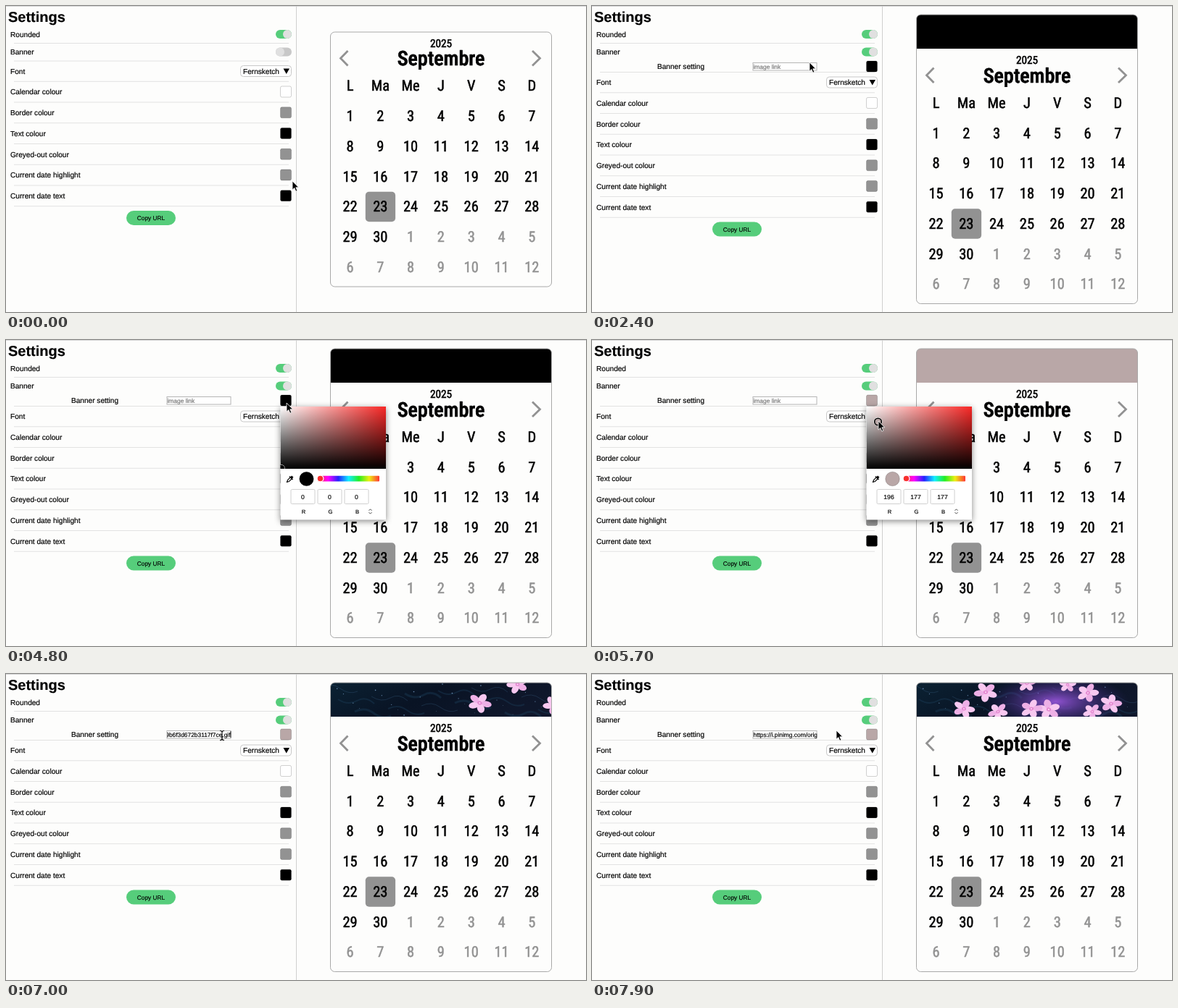
An HTML page that plays this animation: 800 px wide and 423 px high, repeating every 8000 ms.

```html
<!DOCTYPE html>
<html lang="en">
<head>
<meta charset="utf-8">
<title>Calendar settings</title>
<style>
  html, body { margin: 0; width: 100%; height: 100%; overflow: hidden; background: #fdfdfc; }
  svg {
    display: block; width: 800px; height: 423px;
    font: 10.1px 'Liberation Sans', Arial, sans-serif; text-rendering: geometricPrecision;
  }
  text { stroke: #000; stroke-width: .18; }
  .mid { text-anchor: middle; }
  .hint { fill: #757575; stroke: #757575; }
  .hand {
    font-family: 'Roboto Condensed', 'Open Sans Condensed', Roboto, sans-serif;
    font-stretch: condensed; font-weight: 400; font-size: 20.5px;
    text-anchor: middle; stroke-width: .5; stroke-linejoin: round;
  }
  .grey { fill: #929292; stroke: #929292; }
  .year { font-size: 15.3px; }
  .month { font-size: 28px; font-weight: 500; stroke-width: .7; }
  .panel { filter: drop-shadow(0 2px 4px #0007); }
</style>
</head>
<body>
<svg viewBox="0 0 800 423">
  <defs>
    <linearGradient id="sat"><stop stop-color="#fff"/><stop offset="1" stop-color="#f82826"/></linearGradient>
    <linearGradient id="val" x2="0" y2="1"><stop stop-opacity="0"/><stop offset="1"/></linearGradient>
    <linearGradient id="hue"></linearGradient>
    <linearGradient id="sky" x2="1" y2=".3">
      <stop stop-color="#0b2233"/><stop offset=".5" stop-color="#091324"/><stop offset="1" stop-color="#0f172b"/>
    </linearGradient>
    <radialGradient id="glow"><stop stop-color="#8f52d0"/><stop offset="1" stop-color="#3a2a80" stop-opacity="0"/></radialGradient>
    <clipPath id="field"><rect x="222" y="78" width="88.5" height="11"/></clipPath>
    <clipPath id="banner"><path d="M447.5 59V18a6 6 0 0 1 6-6h293a6 6 0 0 1 6 6V59z"/></clipPath>
    <clipPath id="shade"><rect x="378.5" y="92" width="145.5" height="86"/></clipPath>
  </defs>
  <g id="stage"></g>
</svg>
<script>
const LOOP = 8000;
const OFF = 650, ON = 1050, BANNER = 1900, OPEN = 4450, PRESS = 5050, CLOSE = 5900, PASTE = 6550, BLUR = 7600;
const GREY = '#929292', GREEN = [86, 205, 123], TRACK = [200, 200, 200];
const stage = document.getElementById('stage');

document.getElementById('hue').innerHTML =
  ['#f33', '#f0f', '#22f', '#1ef', '#2e2', '#ee1', '#f33']
    .map((c, i) => `<stop offset="${i / 6}" stop-color="${c}"/>`).join('');

// Pointer path: time, x, y of the tip
const path = [
  [100, 395, 242], [500, 380, 45], [1600, 380, 45], [1800, 380, 67], [2050, 380, 67],
  [2400, 300, 78], [2900, 268, 82], [3300, 375, 54], [3550, 375, 54], [3900, 403, 82],
  [4400, 387, 87], [4900, 387, 87], [5050, 406, 128], [5300, 395, 112], [5800, 395, 112],
  [6200, 298, 85], [7500, 298, 85], [7900, 337, 78]
];

// Blossoms: x, y at 7900 ms, size, speed x and y in px/s
const blossoms = [
  [630, 49, 15, -26, 10], [684, 26, 14, -24, 13], [543, 25, 15, -20, 62], [513, 48, 14, -12, 85],
  [560, 52, 13, 8, 88], [600, 13, 12, -18, 55], [606, 48, 14, 14, 84], [656, 15, 11, 10, 60],
  [716, 41, 14, -44, -3], [690, 52, 12, 6, 90]
];

const clamp = (v, a = 0, b = 1) => Math.min(b, Math.max(a, v));
const mix = (a, b, k) => a + (b - a) * k;
const smooth = k => k * k * (3 - 2 * k);
const ease = (t, start, length = 400) => 1 - (1 - clamp((t - start) / length)) ** 2;
const rgb = c => `rgb(${c.map(Math.round)})`;

const text = (x, y, s, attrs = '') => `<text x="${x}" y="${y}" ${attrs}>${s}</text>`;
const rect = (x, y, w, h, fill, attrs = '') =>
  `<rect x="${x}" y="${y}" width="${w}" height="${h}" fill="${fill}" ${attrs}/>`;
const circle = (x, y, r, fill, attrs = '') => `<circle cx="${x}" cy="${y}" r="${r}" fill="${fill}" ${attrs}/>`;
const line = (d, color, width = 1) => `<path d="${d}" fill="none" stroke="${color}" stroke-width="${width}"/>`;
const hand = (x, y, s, kind = '') => text(x, y, s, `class="hand ${kind}"`);
const divider = y => line(`M11 ${y}H390`, '#e2e2e2');
const swatch = (y, color) =>
  rect(378.5, y - 7.5, 15, 15, color, 'rx="2" stroke="#000" stroke-opacity=".18"');

function pointer(t) {
  const i = path.findIndex(p => p[0] > t);
  if (i < 0) return path.at(-1).slice(1);
  if (!i) return path[0].slice(1);
  const [a, b] = [path[i - 1], path[i]];
  const k = smooth((t - a[0]) / (b[0] - a[0]));
  return [mix(a[1], b[1], k), mix(a[2], b[2], k)];
}

// Colour chosen in the picker: what the fields say and what is painted
function choose(t) {
  if (t < PRESS) return { x: 379, y: 178, value: [0, 0, 0], paint: '#000' };
  const [x, y] = pointer(Math.min(t, 5300));
  const s = clamp((x - 381) / 144.5), v = 255 * (1 - clamp((y - 92) / 86.4));
  const value = [v, v * (1 - s), v * (1 - s)].map(Math.round);
  return { x: x - .5, y: y + 1, value, paint: rgb(value.map(c => c * .945)) };
}

const toggle = (y, k) =>
  rect(372, y - 6, 22, 12, rgb(TRACK.map((c, i) => mix(c, GREEN[i], k))), 'rx="6"') +
  circle(378 + 10 * k, y, 6, '#e0e0e0');

function settings(t, color) {
  const open = t >= BANNER, dy = open ? 15.5 : 0;
  let s = text(3, 22, 'Settings', 'font-size="20" font-weight="700"') +
    text(6, 42.5, 'Rounded') + toggle(39, 1 - ease(t, OFF) + ease(t, ON)) + divider(51.5) +
    text(6, 67, 'Banner') + toggle(63.5, ease(t, BANNER)) + divider(76 + dy);
  if (open) s += bannerRow(t, color);

  s += `<g transform="translate(0 ${dy})">` + text(6, 93.5, 'Font') +
    rect(323.5, 82.5, 70, 15, '#fff', 'rx="4" stroke="#c8c8c8"') + text(327, 93.5, 'Fernsketch') +
    '<path d="M382.5 86.5h8.5l-4.25 7.5z"/>' + divider(104.3);
  [['Calendar colour', '#fff'], ['Border colour', GREY], ['Text colour', '#000'],
    ['Greyed-out colour', GREY], ['Current date highlight', GREY], ['Current date text', '#000']
  ].forEach(([label, fill], i) => {
    const y = 118.5 + 28.75 * i;
    s += text(6, y + 3.8, label) + swatch(y, fill) + divider(y + 14.5);
  });
  return s + rect(166, 283, 68, 20, rgb(GREEN), 'rx="10"') +
    text(200, 296, 'Copy URL', 'class="mid" font-size="8.3"') + '</g>';
}

function bannerRow(t, color) {
  const pasted = t >= PASTE, blurred = t >= BLUR;
  const [x, content, attrs] = !pasted ? [222.5, 'image link', 'class="hint"']
    : blurred ? [222.5, 'https://i.pinimg.com/originals', '']
    : [309.5, '9b6f3d672b3117f7ce.gif', 'text-anchor="end"'];
  const caret = t > 6300 && !blurred && (t - PASTE + LOOP) % 1000 < 500;
  return text(90, 87, 'Banner setting') + rect(222, 78.5, 88, 10.5, '#fff', 'stroke="#b4b4b4"') +
    `<g clip-path="url(#field)">${text(x, 86.5, content, `font-size="8.4" ${attrs}`)}</g>` +
    (caret ? line(`M${pasted ? 310 : 223} 79v9`, '#000', .8) : '') + swatch(83.5, color);
}

function blossom([x, y, r, vx, vy], t) {
  const age = (t - 7900) / 1000, tilt = x % 40 - 20;
  let s = `<g transform="translate(${x + vx * age} ${y + vy * age}) rotate(${tilt}) ` +
    `scale(${r / 14} ${r / 17}) rotate(${x + age * 40})">`;
  for (let i = 0; i < 5; i++)
    s += `<ellipse cy="-8.5" rx="4.8" ry="7" fill="${i % 2 ? '#eeb0e6' : '#f8c8f0'}" transform="rotate(${i * 72})"/>`;
  return s + circle(0, 0, 3, '#e58ad2') + circle(0, 0, 1, '#ffe6fa') + '</g>';
}

function nightSky(t) {
  let s = rect(447, 11, 306, 49, 'url(#sky)');
  for (let i = 0; i < 14; i++) {
    const x = 435 + i * 23 - (t - 7000) * .008, y = 18 + i * 17 % 38;
    s += line(`M${x} ${y}q14 ${i % 2 ? 9 : -7} 26 2t24 4`, i % 3 ? '#1d405a66' : '#3a608555', 1 + i % 3);
  }
  for (let i = 0; i < 26; i++)
    s += circle(448 + i * 83.7 % 304, 13 + i * 29.3 % 45, .4 + i % 3 * .2, '#6b8fb5');
  const glow = clamp((t - 7100) / 800);
  s += `<ellipse cx="640" cy="38" rx="100" ry="38" fill="url(#glow)" opacity="${glow}"/>`;
  return s + blossoms.map(b => blossom(b, t)).join('');
}

function calendar(t, color) {
  const open = t >= BANNER, dy = open ? 23.5 : 0;
  const round = t < OFF || t >= ON;
  const [top, height] = open ? [12, 399.5] : [36, 352];
  let s = rect(447.5, top, 305, height, '#fdfdfc', `rx="${round ? 6 : 0}"`);
  if (open) s += `<g clip-path="url(#banner)">${t < PASTE ? rect(447, 11, 306, 48, color) : nightSky(t)}</g>`;
  s += rect(447.5, top, 305, height, 'none', `rx="${round ? 6 : 0}" stroke="#a8a8a8"`) +
    `<g transform="translate(0 ${dy})">` +
    hand(600, 56.5, '2025', 'year') + hand(600, 82, 'Septembre', 'month') +
    line('M471.5 62L461.5 72.3L471.5 82.6M726 62L736.5 72.3L726 82.6', GREY, 2.8) +
    rect(495.8, 256.7, 41.3, 41.5, GREY, `rx="${round ? 5 : 0}"`);
  const column = i => 474.5 + 41.8 * i;
  ['L', 'Ma', 'Me', 'J', 'V', 'S', 'D'].forEach((d, i) => s += hand(column(i), 117.3, d));
  for (let i = 0; i < 42; i++)
    s += hand(column(i % 7), 159.2 + 41.75 * Math.floor(i / 7), i % 30 + 1, i < 30 ? '' : 'grey');
  return s + '</g>';
}

function picker({ x, y, value, paint }) {
  let s = rect(378.5, 92, 145.5, 156.5, '#fff', 'class="panel"') +
    '<g clip-path="url(#shade)">' + rect(378.5, 92, 145.5, 86, 'url(#sat)') + rect(378.5, 92, 145.5, 86, 'url(#val)') +
    circle(x, y, 4.8, 'none', 'stroke="#fff" stroke-width="2.6"') +
    circle(x, y, 4.8, paint, 'stroke="#000" stroke-width="1.6"') + '</g>' +
    line('M387.5 196.5l1-3 4-4 2 2-4 4z', '#000', 1.1) + line('M391 188.5l4.5 4.5', '#000', 1.5) +
    line('M393.3 190.7l2-2', '#000', 3.2) +
    circle(414.5, 192, 9.8, paint, 'stroke="#0004" stroke-width=".7"') +
    rect(430, 187.7, 85, 7.8, 'url(#hue)', 'rx="1"') +
    circle(433.5, 191.5, 4.4, '#f8302e', 'stroke="#fff" stroke-width="1.2"');
  value.forEach((v, i) => {
    const cx = 409.5 + 37 * i;
    s += rect(cx - 16.5, 206.5, 33, 20, '#fff', 'rx="1.5" stroke="#d0d0d0"') +
      text(cx, 219.5, v, 'class="mid" font-size="8.6"') +
      text(cx + 1, 239.5, 'RGB'[i], 'class="mid" font-size="7.6"');
  });
  return s + line('M500.5 235.8l2-2 2 2M500.5 238.2l2 2 2-2', '#333', .9);
}

function cursor(t) {
  const [x, y] = pointer(t);
  if (t > 6200 && t < 7550)
    return line(`M${x - 3} ${y - 6.5}q3 0 3 2v9q0 2-3 2m6-13q-3 0-3 2v9q0 2 3 2M${x - 1.5} ${y + 2}h3`, '#000', 1.1);
  return `<path d="M${x} ${y}v12.2l2.8-2.6 2 4.6 2-.9-2-4.5h3.8z" stroke="#fff" stroke-width=".8"/>`;
}

function draw(now) {
  const t = now % LOOP, color = choose(t);
  stage.innerHTML = line('M0 .5H800', '#d8d8d8') + line('M400.5 0V423', '#cfcfcf') +
    settings(t, color.paint) + calendar(t, color.paint) +
    (t >= OPEN && t < CLOSE ? picker(color) : '') + cursor(t);
  requestAnimationFrame(draw);
}
requestAnimationFrame(draw);
</script>
</body>
</html>
```
